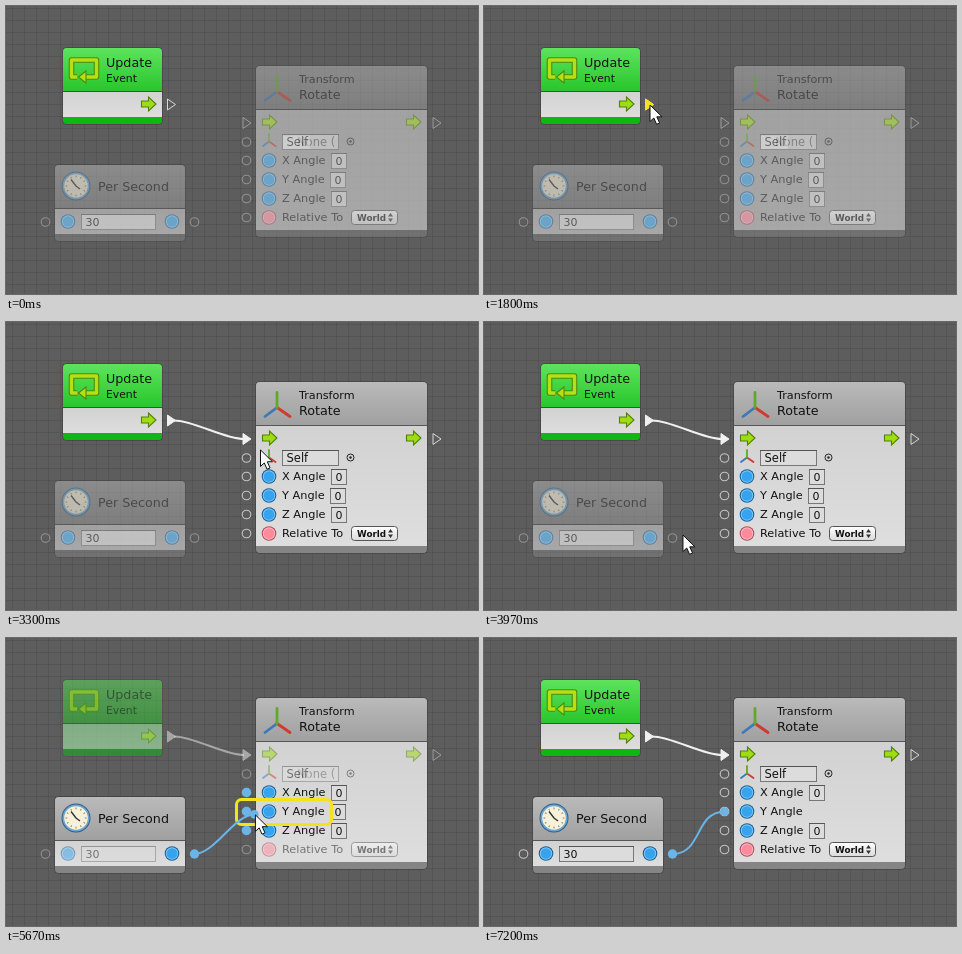
These frames come from a looping animation (472 by 288 pixels, 8.66 s). An HTML page:

```html
<!DOCTYPE html>
<html lang="en">
<head>
<meta charset="utf-8">
<title>Node graph</title>
<style>
html, body { margin: 0; width: 100%; height: 100%; overflow: hidden; background: #5d5d5d; }
svg { display: block; font-family: "DejaVu Sans", Verdana, sans-serif; }
</style>
</head>
<body>
<svg id="stage" width="472" height="288" viewBox="0 0 472 288"></svg>
<script>
const LOOP = 8660;
const PHASES = [1970, 3170, 4700, 6100];
const FLOW = '#f0f0f0', DATA = '#6ab4e8', YELLOW = '#f2e41c';

// Pointer path: time, x, y
const KEYS = [
  [600, 349, 266], [1430, 179, 105], [1800, 166, 99], [1970, 166, 99],
  [2500, 232, 121], [2700, 258, 122], [3170, 258, 122], [3970, 199, 213],
  [4300, 190, 219], [4700, 190, 219], [5500, 249, 177], [5640, 249, 177],
  [5870, 257, 175], [6470, 257, 175], [7200, 131, 288]
];

// Group that is fully visible in the listed phases and faded otherwise
const on = (phases, content, off = .5) =>
  `<g data-on="${phases}" data-off="${off}">${content}</g>`;
const only = (phases, content) => on(phases, content, 0);

const text = (x, y, s, size = 11.3, extra = '') =>
  `<text x="${x}" y="${y}" font-size="${size}" fill="#111" ${extra}>${s}</text>`;

const gradient = (id, a, b) =>
  `<linearGradient id="${id}" x2="0" y2="1"><stop stop-color="${a}"/><stop offset="1" stop-color="${b}"/></linearGradient>`;

// Base and body fade separately, so the base tints a faded body
const node = (phases, x, y, w, h, head, strip) => on(phases, `
  <rect x="${x - .5}" y="${y - .5}" width="${w + 1}" height="${h + 1}" rx="4" fill="none" stroke="#000" stroke-opacity=".2"/>
  <rect x="${x}" y="${y}" width="${w}" height="${h}" rx="4" fill="${strip}"/>
  <path d="M${x} ${y + 43}v-39q0-4 4-4h${w - 8}q4 0 4 4v39z" fill="url(#${head})"/>
  <path d="M${x} ${y + 43.5}h${w}" stroke="#000" stroke-opacity=".35"/>`) +
  on(phases, `<rect x="${x}" y="${y + 44}" width="${w}" height="${h - 51}" fill="url(#body)"/>`);

const box = (x, y, w) => `
  <rect x="${x + .5}" y="${y - 7.5}" width="${w - 1}" height="15" fill="#dcdcdc" stroke="#777"/>
  <path d="M${x} ${y - 7.5}h${w}" stroke="#555"/>`;
const field = (x, y, w, s) => box(x, y, w) + text(x + 4.5, y + 4, s, 11);

const dot = (x, y, rim, fill, glow) => `
  <circle cx="${x}" cy="${y}" r="7.3" fill="${rim}"/>
  <circle cx="${x}" cy="${y}" r="6.2" fill="${glow}"/>
  <circle cx="${x}" cy="${y}" r="5.3" fill="${fill}"/>`;
const blue = (x, y) => dot(x, y, '#1a5f96', '#35a3ee', '#7fcbfb');

const ring = (x, y) => `<circle cx="${x}" cy="${y}" r="4.3" fill="none" stroke="#c4c4c4" stroke-width="1.1"/>`;
const plug = (x, y) => `<circle cx="${x}" cy="${y}" r="4.7" fill="${DATA}"/>`;
const triangle = (x, y, fill = 'none', id = '') =>
  `<path ${id} d="M${x} ${y - 5.5}l8 5.5-8 5.5z" fill="${fill}" stroke="${fill == 'none' ? '#d8d8d8' : fill}"/>`;

const arrow = (x, y) =>
  `<path d="M${x + .5} ${y - 3}h7v-4l7.5 7-7.5 7v-4h-7z" fill="#a0dc12" stroke="#52800c" stroke-width="1.1"/>`;

const axes = (x, y, k, w) => [['#3d78b8', -12, 9], ['#cf3b30', 13, 9], ['#62a82c', 0, -15]]
  .map(([c, dx, dy]) => `<path d="M${x} ${y}l${dx * k} ${dy * k}" stroke="${c}" stroke-width="${w}" stroke-linecap="round"/>`).join('');

const loopIcon = ['#4f8a10" stroke-width="5.6', '#b6e014" stroke-width="3.4'].map(s =>
  `<path d="M71 71h-5.500V54h25V71H79" fill="none" stroke-linejoin="round" stroke="${s}"/>`).join('') +
  '<path d="M72.500 71l7.500-6v12z" fill="#b6e014" stroke="#4f8a10" stroke-width="1.1"/>';

const ticks = [...Array(12)].map((_, i) =>
  `<path d="M70 169.500v1.800" transform="rotate(${i * 30} 70 180)" stroke="#8a8068"/>`).join('');
const clock = `
  <circle cx="70" cy="180" r="14.500" fill="#2f5f8a"/><circle cx="70" cy="180" r="13.500" fill="#6fa6d0"/>
  <circle cx="70" cy="180" r="11.800" fill="#f8f1da"/>${ticks}
  <path d="M65 173.500l5 6.500 4 3" fill="none" stroke="#333" stroke-width="1.400"/>`;

const angle = (name, y, shown) => on('24', only('3', plug(240.5, y)) + only('0124', ring(240.5, y))) +
  only('3', plug(240.5, y)) +
  on('234', blue(263, y) + text(276, y + 3.7, name + ' Angle') +
    only(shown, field(name == 'Y' ? 324 : 325, y + .5, 16, '0')));

const update = node('0124', 57, 42, 99, 76, 'green', '#0cb814') + on('0124',
  loopIcon + text(100, 61, 'Update', 12.7) + text(100, 76, 'Event', 10.8) + arrow(135, 98) +
  only('0', triangle(161.5, 98.5)) + only('1234', triangle(161.5, 98.5, FLOW)) +
  triangle(161.5, 98.5, YELLOW, 'id="hover"'));

const perSecond = node('34', 49, 159, 130, 76, 'gray', '#858585') +
  on('34', clock + text(92, 185, 'Per Second', 12.7) + blue(166, 215.5) +
    only('012', ring(188.5, 216)) + only('34', plug(188.5, 216))) +
  on('4', ring(39.5, 216) + blue(62, 215.5) + field(75, 216, 75, '30'));

const popup = `
  <rect x="345.500" y="204.500" width="46" height="14" rx="3" fill="url(#button)" stroke="#555"/>
  ${text(351, 215, 'World', 8.8, 'font-weight="bold"')}
  <path d="M382 210.500l2.500-3.500 2.500 3.500zM382 212.500l2.500 3.500 2.500-3.500z" fill="#333"/>`;

const rotate = node('1234', 250, 60, 171, 171, 'gray', '#858585') +
  on('1234', axes(271, 85.5, 1, 2.8) + text(293, 77.3, 'Transform', 11.2) + text(293, 93, 'Rotate', 12.7)) +
  on('124', only('0', triangle(237, 117)) + only('1234', triangle(237, 117, FLOW)) + arrow(256, 116)) +
  on('24', arrow(400, 116) + triangle(427, 117)) +
  on('24', ring(240.5, 136) + axes(263, 135.5, .5, 1.8) + box(276, 136, 57) +
    only('013', `<g opacity=".6">${text(291, 140, 'None (', 11.5)}</g>`) +
    '<circle cx="344.500" cy="135.500" r="3.500" fill="none" stroke="#222"/><circle cx="344.500" cy="135.500" r="1.200" fill="#222"/>') +
  on('24', '<rect x="277" y="129.500" width="27" height="13.500" fill="#dcdcdc"/>' + text(280.5, 140, 'Self', 11.5)) +
  angle('X', 154.5, '01234') + angle('Y', 173.5, '0123') + angle('Z', 192.5, '01234') +
  on('24', ring(240.5, 211.5) + dot(263, 211.5, '#b34a5c', '#ff8a9c', '#ffbcc6') +
    text(276, 215, 'Relative To') + popup);

const stage = document.getElementById('stage');
stage.innerHTML = `<defs>
  ${gradient('gray', '#bababa', '#a0a0a0')}${gradient('green', '#5de35d', '#29c62c')}
  ${gradient('body', '#d2d2d2', '#dedede')}${gradient('button', '#fff', '#dadada')}
  <pattern id="grid" x="6" y="2" width="12" height="12" patternUnits="userSpaceOnUse">
    <path d="M.5 0v12M0 .5h12" stroke="#000" stroke-opacity=".09"/></pattern></defs>
  <rect width="472" height="288" fill="url(#grid)"/>${update}${perSecond}${rotate}
  <rect id="frame" fill="none" stroke="${YELLOW}" stroke-width="3" rx="5"/>
  ${on('0124', `<path id="flow" fill="none" stroke="${FLOW}" stroke-width="2"/>`)}
  <path id="data" fill="none" stroke="${DATA}" stroke-width="2"/>
  <path id="flowEnd" d="M-7-6.500l8 5.500-8 5.500z" fill="${FLOW}"/>
  <circle id="dataEnd" r="4.300" fill="${DATA}"/>
  <path id="pointer" d="M0 0v16.500l3.800-3.500 2.800 6.300 3-1.300-2.800-6.200h5.200z" fill="#fff" stroke="#111"/>`;

const get = id => document.getElementById(id);
const [hover, frame, flow, data, flowEnd, dataEnd, pointer] =
  ['hover', 'frame', 'flow', 'data', 'flowEnd', 'dataEnd', 'pointer'].map(get);
const faders = [...stage.querySelectorAll('[data-on]')];

const show = (el, visible) => el.setAttribute('visibility', visible ? 'visible' : 'hidden');
const place = (el, x, y) => el.setAttribute('transform', `translate(${x} ${y})`);

// Monotone cubic interpolation along one axis of KEYS
function track(t, axis) {
  const slope = i => KEYS[i] && KEYS[i + 1]
    ? (KEYS[i + 1][axis] - KEYS[i][axis]) / (KEYS[i + 1][0] - KEYS[i][0]) : 0;
  const tangent = i => {
    const a = slope(i - 1), b = slope(i);
    return a * b > 0 ? 2 * a * b / (a + b) : 0;
  };
  if (t <= KEYS[0][0]) return KEYS[0][axis];
  const i = KEYS.findIndex((k, n) => n && t <= k[0]) - 1;
  if (i < 0) return KEYS[KEYS.length - 1][axis];
  const [a, b] = [KEYS[i], KEYS[i + 1]], d = b[0] - a[0], u = (t - a[0]) / d, v = 1 - u;
  return v * v * (1 + 2 * u) * a[axis] + u * u * (1 + 2 * v) * b[axis] +
    d * u * v * (v * tangent(i) - u * tangent(i + 1));
}

function wire(el, x0, y0, x1, y1, pull = 20) {
  const back = Math.min(pull, Math.max(0, x1 - x0));
  el.setAttribute('d', `M${x0} ${y0}C${x0 + pull} ${y0} ${x1 - back} ${y1} ${x1} ${y1}`);
}

function outline(x, y, w, h) {
  Object.entries({ x, y, width: w, height: h }).forEach(([k, v]) => frame.setAttribute(k, v));
}

function draw(t) {
  const phase = PHASES.filter(p => t >= p).length;
  const x = track(t, 1), y = track(t, 2);
  const dragFlow = t >= 1970 && t < 2900, dragData = phase == 3;

  for (const el of faders)
    el.setAttribute('opacity', el.dataset.on.includes(phase) ? 1 : el.dataset.off);

  show(pointer, t >= 600 && t < 7200);
  place(pointer, x, y);
  show(hover, t >= 1600 && t < 1970);

  show(flow, phase > 0);
  if (dragFlow) wire(flow, 168, 98.5, x - 6, y - 1);
  else wire(flow, 168, 98.5, 238, 117);
  show(flowEnd, dragFlow);
  place(flowEnd, x, y);

  // The data wire follows the pointer, then stays in the input port
  const [endX, endY] = dragData ? [x - 1, y - .5] : [240.5, 173.7];
  show(data, phase > 2);
  wire(data, 188.5, 216, endX, endY, dragData ? 20 : 30);
  show(dataEnd, phase > 2);
  place(dataEnd, endX, endY);

  show(frame, (dragFlow || dragData) && x > 233);
  if (dragFlow) outline(231, 105, 39, 25);
  else outline(230.5, 161.5, 95, 25);
}

const start = performance.now();
function tick() {
  draw((performance.now() - start) % LOOP);
  requestAnimationFrame(tick);
}
tick();
</script>
</body>
</html>
```
